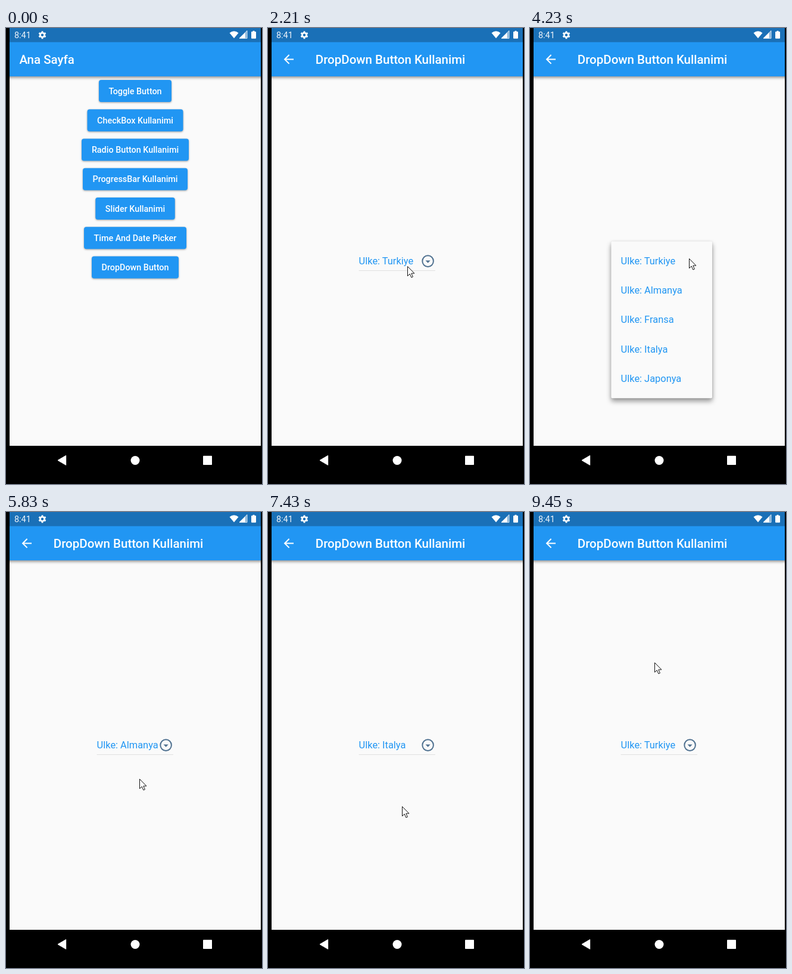
Animation of 430 by 764 pixels, one loop 9.85 s. Source, as an HTML page:

```html
<!DOCTYPE html>
<html lang="tr">
<head>
<meta charset="utf-8">
<title>DropDown Button</title>
<style>
html, body { margin: 0; width: 100%; height: 100%; overflow: hidden; background: #000; }
svg { display: block; width: 430px; height: 764px; font-family: Roboto, sans-serif; }
.title { font-size: 20.5px; font-weight: 500; fill: #fff; }
.button text { font-size: 14.36px; font-weight: 500; fill: #fff; text-anchor: middle; }
.button rect { fill: #2196f3; filter: drop-shadow(0 1.5px 1.5px rgba(0,0,0,.36)); }
.item { font-size: 16.41px; fill: #2196f3; }
#bar { fill: #2196f3; filter: drop-shadow(0 2px 2.5px rgba(0,0,0,.45)); }
#panel { fill: #fafafa; filter: drop-shadow(0 5px 4.5px rgba(0,0,0,.36)) drop-shadow(0 1px 2px rgba(0,0,0,.14)); }
</style>
</head>
<body>
<svg viewBox="0 0 430 764">
  <defs>
    <clipPath id="buttonClip"><rect x="144" y="382.5" width="146" height="37" rx="4"/></clipPath>
    <clipPath id="menuClip"><rect id="menuMask" x="136.4" width="169.6"/></clipPath>
  </defs>
  <rect x="6" width="422" height="700" fill="#fafafa"/>
  <rect id="bar" x="-10" y="-10" width="450" height="91"/>
  <rect x="6" width="422" height="23.7" fill="#1a70b7"/>

  <g id="home">
    <text class="title" x="22.4" y="60">Ana Sayfa</text>
    <g id="buttons"></g>
    <g id="press" clip-path="url(#buttonClip)" fill="#fff">
      <rect id="glow" x="144" y="382" width="146" height="38"/>
      <circle id="ripple" cx="234" cy="401" fill-opacity=".14"/>
    </g>
  </g>

  <g id="detail">
    <path transform="translate(22.5 40.1) scale(1.0258)" fill="#fff" d="M20 11H7.83l5.59-5.59L12 4l-8 8 8 8 1.41-1.41L7.83 13H20z"/>
    <text class="title" x="79.8" y="60">DropDown Button Kullanimi</text>
    <text id="label" class="item" x="152.6" y="396"></text>
    <circle cx="268.6" cy="390.6" r="9.3" fill="none" stroke="#4f7190" stroke-width="2"/>
    <path d="M264.5 389.6h8.2l-4.1 4.1z" fill="#4f7190"/>
    <rect x="152.6" y="406" width="128.4" height="1" fill="#e0e0e0"/>
    <g id="menu">
      <rect id="panel" x="136.4" width="169.6" rx="2"/>
      <g id="items" clip-path="url(#menuClip)"></g>
    </g>
  </g>

  <path d="M0 0H6V700H428V0H430V764H0z"/>
  <g fill="#fff">
    <text x="14" y="17" font-size="14.4" fill="#eef4fa">8:41</text>
    <g fill="none" stroke="#fff">
      <circle cx="61" cy="11.7" r="3.6" stroke-width="2.8"/>
      <circle cx="61" cy="11.7" r="5.5" stroke-width="2" pathLength="12" stroke-dasharray="1 1" stroke-dashoffset="-.5"/>
    </g>
    <path d="M375.5 8.2Q383 2.2 390.500 8.200L383 17.300z"/>
    <path d="M392 17.300L405 4.500V17.300z" opacity=".45"/>
    <path d="M392 17.300L402 7.500V17.300z"/>
    <path d="M405 4.500V17.300H392z" fill="none" stroke="#fff" stroke-width=".8"/>
    <path d="M412 7q0-1 1-1h1.500V4.700h3V6h1.500q1 0 1 1v9.800q0 1-1 1h-6q-1 0-1-1z"/>
    <path d="M87 724.300L100.700 716.300V732.300z" stroke="#fff" stroke-linejoin="round"/>
    <circle cx="217" cy="724.500" r="7.500"/>
    <rect x="331" y="716.700" width="15" height="15.300" rx=".8"/>
  </g>
  <path id="cursor" d="M.5.500V16.500L4.200 13 6.900 19 9.400 17.900 6.800 12.100H11.900z" fill="#fff" stroke="#111" stroke-width="1"/>
</svg>
<script>
const LOOP = 9850, PITCH = 49.24, CENTER = 390.4;
const countries = ['Turkiye', 'Almanya', 'Fransa', 'Italya', 'Japonya'];
const buttons = [
  ['Toggle Button', 122], ['CheckBox Kullanimi', 161], ['Radio Button Kullanimi', 180],
  ['ProgressBar Kullanimi', 176], ['Slider Kullanimi', 133.5], ['Time And Date Picker', 172],
  ['DropDown Button', 146]
];
// Runs of screen updates: first time, count, interval
const runs = [[0, 1, 0], [200, 5, 197.5], [1810, 3, 200], [2810, 3, 200], [3830, 3, 200],
  [5230, 2, 200], [5830, 12, 200], [8250, 7, 200]];
const ticks = runs.flatMap(([start, count, gap]) => Array.from({ length: count }, (_, i) => start + i * gap));
// Pointer moves: start, end, target x, target y
const moves = [[200, 990, 234, 399], [2610, 3210, 267, 386], [5030, 5430, 224, 447], [5830, 6230, 234, 387],
  [6630, 7230, 225, 493], [7430, 8030, 237, 385], [8450, 9250, 209, 252]];
// Menu sessions: opening, closing, selected index
const sessions = [[3780, 5830, 0], [6380, 7430, 1], [8200, 9450, 3]];

const $ = id => document.getElementById(id);
const clamp = v => Math.max(0, Math.min(1, v));
const mix = (a, b, k) => a + (b - a) * k;
const set = (el, attrs) => { for (const k in attrs) el.setAttribute(k, attrs[k]); };
const show = (id, on) => $(id).style.display = on ? '' : 'none';
function add(parent, tag, attrs, text = '') {
  const el = document.createElementNS('http://www.w3.org/2000/svg', tag);
  set(el, attrs);
  el.textContent = text;
  return parent.appendChild(el);
}

buttons.forEach(([text, width], i) => {
  const g = add($('buttons'), 'g', { class: 'button' }), y = 87.1 + i * PITCH;
  add(g, 'rect', { x: 217 - width / 2, y, width, height: 36.9, rx: 4 });
  add(g, 'text', { x: 217, y: y + 23.6 }, text);
});
const lastButton = $('buttons').lastChild.firstChild;
const items = countries.map(name => add($('items'), 'text', { class: 'item', x: 152.6 }, 'Ulke: ' + name));

function drawPress(t) {
  const k = clamp((t - 1750) / 260);
  show('press', k > 0);
  set($('ripple'), { r: 25 * k });
  set($('glow'), { 'fill-opacity': 0.07 * k });
  lastButton.style.filter = k ? `drop-shadow(0 ${1.5 + 1.5 * k}px ${1.5 + k}px rgba(0,0,0,.36))` : '';
}

function drawMenu(t) {
  const session = sessions.find(([open, close]) => t >= open && t < close);
  show('menu', session);
  if (!session) return;
  const [open, , selected] = session;
  const u = clamp((t - open) / 300), grow = clamp(u * 4 - 1);
  const full = CENTER - selected * PITCH - 32.8;
  const y = mix(CENTER - PITCH / 2, full, grow);
  const height = mix(PITCH, 5 * PITCH + 16.4, grow);
  set($('menu'), { opacity: clamp(u * 4) });
  set($('panel'), { y, height });
  set($('menuMask'), { y, height });
  const unit = 0.5 / (countries.length + 1.5);
  items.forEach((el, i) => set(el, {
    y: CENTER + 5.6 + (i - selected) * PITCH,
    opacity: i === selected ? 1 : clamp((u - 0.5 - (i + 1) * unit) / (1.5 * unit))
  }));
}

function drawCursor(t) {
  let x = 388, y = 738;
  for (const [start, end, toX, toY] of moves) {
    const u = clamp((t - start) / (end - start)), k = u * (2 - u);
    x = mix(x, toX, k);
    y = mix(y, toY, k);
  }
  show('cursor', t >= 200);
  set($('cursor'), { transform: `translate(${x} ${y})` });
}

function render(time) {
  const t = ticks.filter(tick => tick <= time).pop();
  const chosen = t < 5830 ? 0 : t < 7430 ? 1 : t < 9450 ? 3 : 0;
  show('home', t < 2210);
  show('detail', t >= 2210);
  $('label').textContent = 'Ulke: ' + countries[chosen];
  drawPress(t);
  drawMenu(t);
  drawCursor(t);
}

const began = performance.now();
function loop() {
  render((performance.now() - began) % LOOP);
  requestAnimationFrame(loop);
}
loop();
</script>
</body>
</html>
```
